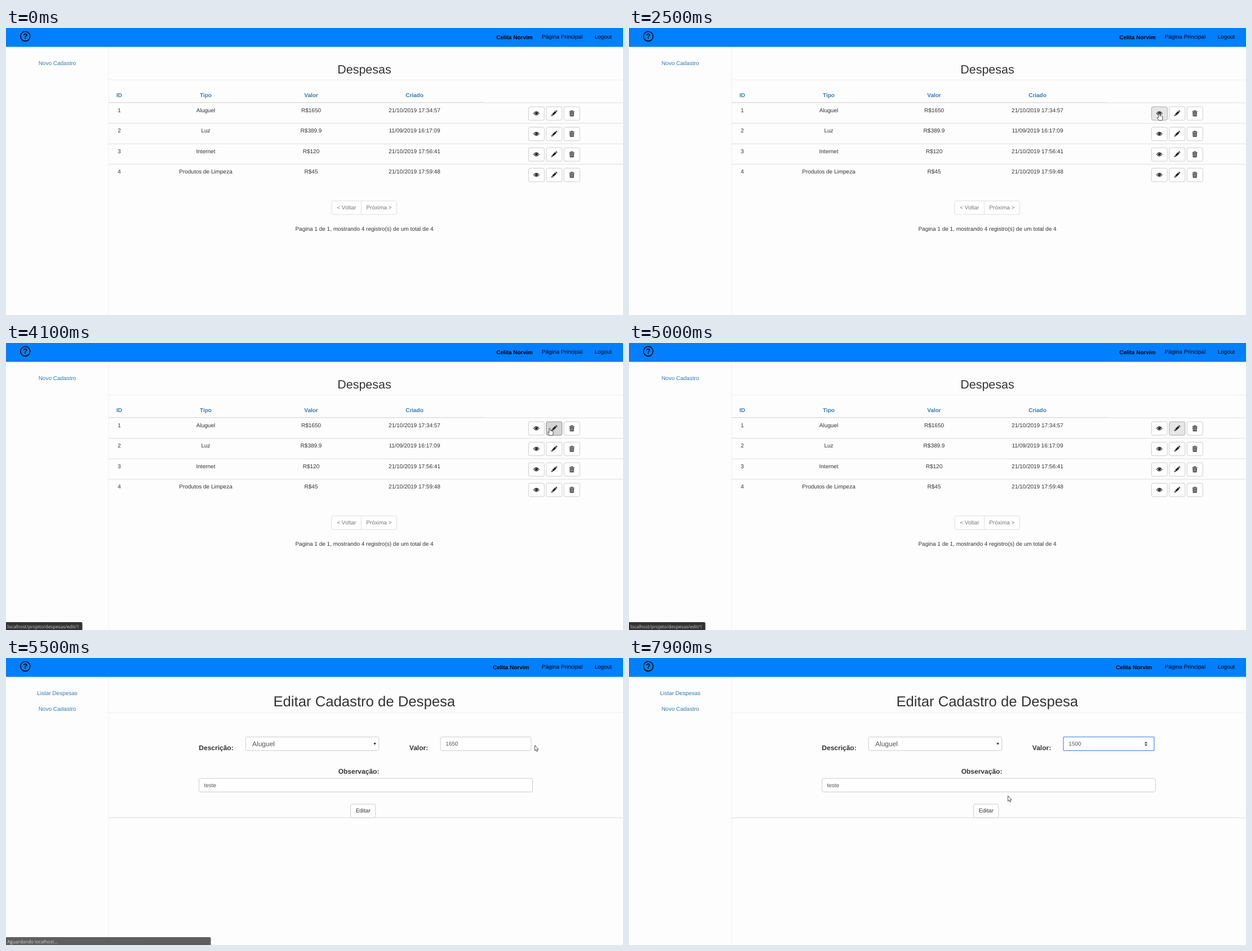
Recreate the animation shown at these times as an HTML page. Size 1095 px wide and 511 px high, loop 8000 ms.

```html
<!DOCTYPE html>
<html lang="pt-BR">
<head>
<meta charset="utf-8">
<title>Despesas</title>
<style>
  html, body { margin: 0; width: 100%; height: 100%; overflow: hidden; background: #fdfdfd; }
  svg { display: block; width: 100%; height: 100%; }
  text { font: 10px "Liberation Sans", Arial, sans-serif; text-rendering: geometricPrecision; white-space: pre; }
  .ui { font-family: "Open Sans", "Noto Sans", sans-serif; }
</style>
</head>
<body>
<svg id="stage" viewBox="0 0 1095 511"></svg>
<script>
const LOOP = 8000, STEP = 100;
const PAGE_LOAD = 5300;
const DIGIT = 5.56;
const INK = '#333', LINK = '#337ab7', FIELD = '#555';
const stage = document.getElementById('stage');

// Pointer hotspot: [time, x, y]
const POINTER = [
  [300, 259, 63], [900, 572, 177], [1200, 572, 177], [1500, 760, 162], [1600, 760, 162],
  [2100, 902, 149], [2200, 902, 149], [2500, 941, 152], [2800, 988.5, 154], [3000, 965, 152],
  [4700, 965, 152], [4900, 957, 153], [5300, 975, 160], [5500, 938.5, 155.5], [5700, 830, 152],
  [5800, 830, 152], [6300, 745, 158.5], [7500, 745, 158.5], [7900, 672.5, 245.5]
];

const ROWS = [
  ['1', 'Aluguel', 'R$1650', '21/10/2019 17:34:57'],
  ['2', 'Luz', 'R$389.9', '11/09/2019 16:17:09'],
  ['3', 'Internet', 'R$120', '21/10/2019 17:56:41'],
  ['4', 'Produtos de Limpeza', 'R$45', '21/10/2019 17:59:48']
];
const COLUMNS = [201, 354.5, 541.5, 725];
const BUTTON_X = [927, 958.5, 990];

const ICONS = [
  `<path d="M-5 0Q0-6.4 5 0Q0 6.4-5 0Z" fill="none" stroke="${INK}" stroke-width="1.1"/>
   <circle cy="-.4" r="2.7" fill="#222"/><path d="M-1.4-.6Q-1.2-1.8 0-1.9" fill="none" stroke="#fff" stroke-width=".8"/>`,
  '<path d="M-5 5l.9-3.3 2.4 2.4zM-3.6 1.2L1.8-4.2 4.2-1.8-1.2 3.6zM2.5-4.9l.6-.5q.6-.4 1.1 0l1.2 1.2q.5.6 0 1.1l-.6.6z" fill="#222"/>',
  `<path d="M-4.5-4h9v1.3h-9zM-3.9-2h7.8l-.5 7.2h-6.8z" fill="${INK}"/>
   <path d="M-1.5-4v-1h3v1" fill="none" stroke="${INK}"/>
   <path d="M-1.9-1v5M0-1v5M1.9-1v5" stroke="#fff" stroke-width=".7"/>`
];

const CURSORS = {
  arrow: '<path d="M0 0V9.6L2.2 7.6 3.7 11 5.2 10.3 3.8 7.1H6.6Z" fill="#fff" stroke="#222" stroke-width=".8"/>',
  hand: `<path d="M-1.1 6V1Q-1.1 0 0 0T1.1 1V4.2Q2.2 3.7 2.9 4.6 4 4.2 4.6 5.1 6 4.9 6 6.3V9Q6 10.8 4.8 12.6H-.2
         Q-1-.4 11-3 8.3-3.8 7-2.8 6.4-1.9 6.2-1.1 7.5Z" fill="#fff" stroke="#222" stroke-width=".8"/>`
    .replace('Q-1-.4 11-3 8.3-3.8 7-2.8 6.4-1.9 6.2-1.1 7.5Z', 'L-3 9Q-3.8 7.4-2.8 6.8T-1.1 7.8Z'),
  beam: '<path d="M-2-5.5H2M0-5.5V5.5M-2 5.5H2" fill="none" stroke="#222" stroke-width=".9"/>'
};

const text = (x, y, content, { fill = INK, size = 10, anchor = 'middle', bold = false, ui = false } = {}) =>
  `<text x="${x}" y="${y}" fill="${fill}" text-anchor="${anchor}" class="${ui ? 'ui' : ''}"
    style="font-size:${size}px;font-weight:${bold ? 700 : 400}">${content}</text>`;
const box = (x, y, w, h, { fill = '#fff', stroke = '#ccc', r = 2.8, width = 1 } = {}) =>
  `<rect x="${x}" y="${y}" width="${w}" height="${h}" rx="${r}" fill="${fill}" stroke="${stroke}" stroke-width="${width}"/>`;
const rule = (x1, x2, y, color = '#ddd', width = 1) =>
  `<path d="M${x1} ${y}H${x2}" stroke="${color}" stroke-width="${width}"/>`;

function pointerAt(t) {
  const next = POINTER.findIndex(key => key[0] > t);
  if (next < 0) return POINTER[POINTER.length - 1].slice(1);
  const [t0, x0, y0] = POINTER[Math.max(0, next - 1)];
  const [t1, x1, y1] = POINTER[next];
  const k = Math.max(0, t - t0) / (t1 - t0 || 1);
  return [x0 + (x1 - x0) * k, y0 + (y1 - y0) * k];
}

const hoveredButton = (x, y) =>
  y > 140 && y < 164.5 ? BUTTON_X.findIndex(left => x >= left && x <= left + 28.5) : -1;

function frame(nameX) {
  return `<rect width="1095" height="511" fill="#fdfdfd"/>
    <rect width="1095" height="33.6" fill="#007fff"/>
    <circle cx="34.2" cy="14.8" r="8.5" fill="none" stroke="#000" stroke-width="1.6"/>
    ${text(34.2, 19.3, '?', { fill: '#000', size: 13, bold: true })}
    ${text(nameX, 19.7, 'Celita Norvim', { fill: '#000', bold: true })}
    ${text(987, 18.8, 'Página Principal', { fill: '#000' })}
    ${text(1060, 18.8, 'Logout', { fill: '#000' })}
    <path d="M182 34V511" stroke="#eee"/>`;
}

function listPage(t, active) {
  const headings = ['ID', 'Tipo', 'Valor', 'Criado']
    .map((label, i) => text(COLUMNS[i], 122.6, label, { fill: LINK, bold: true })).join('');
  const rows = ROWS.map((cells, row) => {
    const dy = row * 36.5;
    const buttons = BUTTON_X.map((x, i) => {
      const on = row === 0 && i === active;
      const pressed = on && t >= 4100 && t < 4800;
      const style = on ? { fill: pressed ? '#d4d4d4' : '#e6e6e6', stroke: pressed ? '#8c8c8c' : '#adadad' } : {};
      return box(x + .3, 140.2 + dy, 28, 24, style) +
        `<g transform="translate(${x + 14.2} ${152 + dy})">${ICONS[i]}</g>`;
    }).join('');
    return rule(row ? 182 : 848, 1095, 133.2 + dy) + buttons +
      cells.map((cell, i) => text(COLUMNS[i], 149.7 + dy, cell)).join('');
  }).join('');
  return frame(902.4) + text(91, 65.6, 'Novo Cadastro', { fill: LINK }) +
    text(636, 81.2, 'Despesas', { size: 21.43 }) + rule(182, 1095, 92.3, '#eee') +
    headings + rule(182, 848, 132.7, '#ddd', 1.5) + rows +
    box(578, 307.8, 115.5, 24.2, { stroke: '#ddd' }) + '<path d="M630.4 308V332" stroke="#ddd"/>' +
    text(604.3, 323.4, '&lt; Voltar', { fill: '#777' }) + text(661.8, 323.4, 'Próxima &gt;', { fill: '#777' }) +
    text(636, 360.9, 'Pagina 1 de 1, mostrando 4 registro(s) de um total de 4');
}

function valueField(t, x) {
  const focused = t >= 5900, typing = t >= 6800;
  const typed = [6800, 7000, 7200, 7300].filter(at => t >= at).length;
  const value = typing ? '1500'.slice(0, typed) : '1650';
  const plain = focused && !typing ? Math.max(0, Math.min(4, Math.round((x - 780) / DIGIT))) : value.length;
  const split = 780.2 + plain * DIGIT;
  let out = box(771, 140.6, 161, 24.2, focused ? { stroke: '#6f9ff0', r: 1, width: 1.5 } : {});
  if (plain < value.length)
    out += `<rect x="${split}" y="147" width="${(value.length - plain) * DIGIT + .3}" height="11.3" fill="#3390ff"/>`;
  out += text(780.2, 156, value.slice(0, plain), { fill: FIELD, anchor: 'start' }) +
    text(split, 156, value.slice(plain), { fill: '#fff', anchor: 'start' });
  if (typing && t < 7600) out += `<path d="M${split + .4} 147.3V157.7" stroke="#333" stroke-width=".8"/>`;
  if (t >= 5600) out += '<path d="M914.8 152L917.4 148.9 920 152ZM914.8 153.8L917.4 156.9 920 153.8Z" fill="#444"/>';
  return out;
}

function editPage(t, x) {
  const label = (left, y, content) => text(left, y, content, { size: 12, bold: true, anchor: 'start' });
  return frame(896.2) +
    text(91, 65.6, 'Listar Despesas', { fill: LINK }) + text(91, 94.2, 'Novo Cadastro', { fill: LINK }) +
    text(635.8, 85.6, 'Editar Cadastro de Despesa', { size: 25.7 }) + rule(182, 1095, 97.3, '#eee') +
    label(342.3, 164, 'Descrição:') + box(425.3, 140.6, 236.4, 24.2) +
    text(437, 157.2, 'Aluguel', { fill: FIELD, size: 12, anchor: 'start' }) +
    '<path d="M652.3 151H656.9L654.6 155Z" fill="#333"/>' +
    label(715.8, 164, 'Valor:') + valueField(t, x) +
    label(589.7, 206.2, 'Observação:') + box(342.5, 214.3, 592, 24.2) +
    text(351.5, 229.6, 'teste', { fill: FIELD, anchor: 'start' }) +
    rule(182, 1095, 284.5) + box(611.6, 260.2, 44.2, 24) + text(633.7, 275.4, 'Editar');
}

function statusBar(t) {
  if (t < 2900 || t >= 5700) return '';
  const waiting = t >= 5200;
  const opacity = t < 3000 ? .5 : t < 5400 ? 1 : { 5400: .92, 5500: .78, 5600: .35 }[t];
  return `<g opacity="${opacity}">
    <path d="M0 497H${waiting ? 361 : 133}q2.5 0 2.5 2.5V511H0Z" fill="#333"/>
    ${text(2.4, 507.6, waiting ? 'Aguardando localhost...' : 'localhost/projeto/despesas/edit/1',
      { fill: '#c8c8c8', size: 8.15, anchor: 'start', ui: true })}</g>`;
}

function render(t) {
  const [x, y] = pointerAt(t);
  const editing = t >= PAGE_LOAD;
  const visible = t >= 300 && (t < 5000 || editing);
  const over = visible ? hoveredButton(x, y) : -1;
  const active = t >= 3000 ? 1 : over;
  const inField = x > 771 && x < 932 && y > 140 && y < 165;
  const cursor = editing ? (inField ? 'beam' : 'arrow') : (over >= 0 ? 'hand' : 'arrow');
  let out = editing ? editPage(t, x) : listPage(t, active);
  out += statusBar(t);
  if (t >= 3500 && t < 4100)
    out += box(971.5, 162.5, 33, 18, { stroke: '#888', r: 0 }) +
      text(988, 174.6, 'Editar', { fill: '#575757', size: 8.4, ui: true });
  if (visible) out += `<g transform="translate(${x} ${y})">${CURSORS[cursor]}</g>`;
  stage.innerHTML = out;
}

const start = performance.now();
let shown = -1;
function tick() {
  const t = Math.floor((performance.now() - start) % LOOP / STEP) * STEP;
  if (t !== shown) render(shown = t);
  requestAnimationFrame(tick);
}
tick();
</script>
</body>
</html>
```
